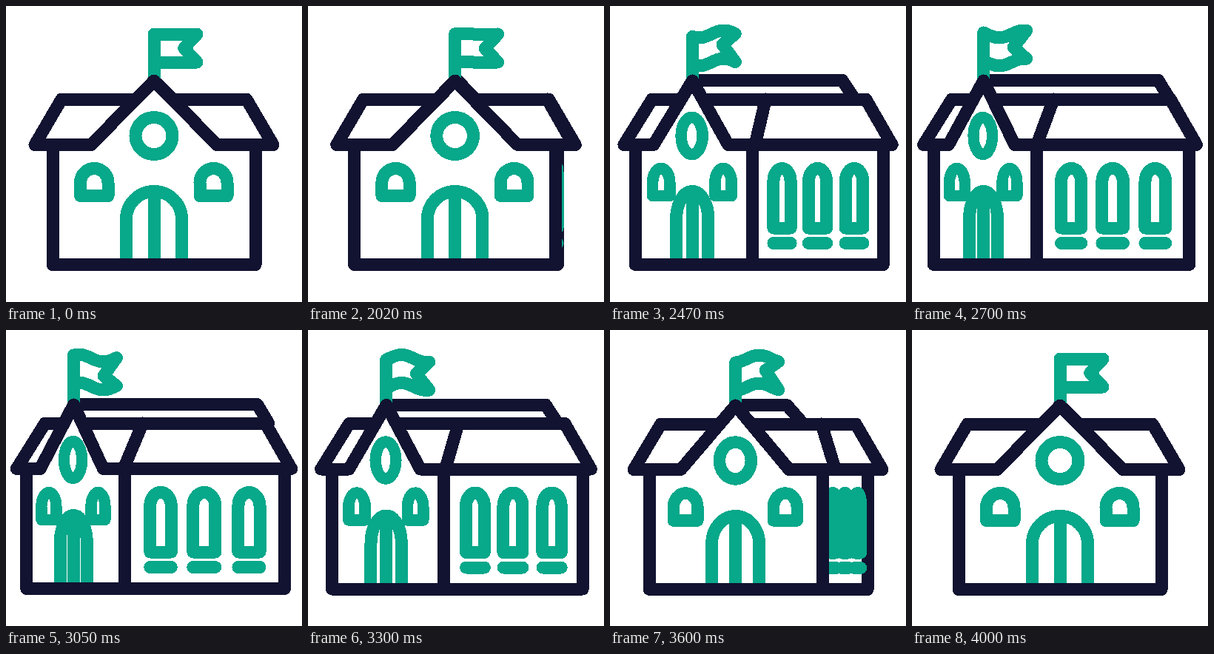
An HTML page for the animation above (4020 ms loop, 400 by 400 pixels).

```html
<!DOCTYPE html>
<html lang="en">
<head>
<meta charset="utf-8">
<title>School</title>
<style>
  html, body { margin: 0; width: 100%; height: 100%; overflow: hidden; background: #fff; }
  svg { display: block; width: 100vw; height: 100vh; shape-rendering: crispEdges; }
  path, ellipse { fill: none; stroke-width: 17; stroke-linejoin: round; stroke-linecap: round; }
  .dark { stroke: #121331; }
  .green { stroke: #08a88a; }
  .butt { stroke-linecap: butt; }
</style>
</head>
<body>
<svg viewBox="0 0 400 400">
  <g id="school">
    <path id="ridge" class="dark"/>
    <path id="flag" class="green butt"/>
    <path id="roof" class="dark"/>
    <path id="sideWall" class="dark"/>
    <path id="sideWindows" class="green"/>
    <path id="frontFill" style="fill:#fff"/>
    <path id="door" class="green butt"/>
    <path id="frontWindows" class="green"/>
    <ellipse id="clock" class="green" cy="175.5" ry="25"/>
    <path id="frontWall" class="dark"/>
    <path id="gable" class="dark"/>
  </g>
</svg>
<script>
const LOOP = 4020, TURN = 2000, BACK = 3000, END = 4000, REACH = 177;
const EAVE = 187.5, LEDGE = 126, PEAK = 101, FLOOR = 349.5;
const $ = Object.fromEntries([...document.querySelectorAll('[id]')].map(el => [el.id, el]));
const clamp = v => Math.max(0, Math.min(1, v));
const draw = (el, d) => el.setAttribute('d', d);

// Cubic easing with flat ends; a and b are the handles' time positions.
function ease(u, a, b) {
  let lo = 0, hi = 1;
  for (let i = 0; i < 24; i++) {
    const s = (lo + hi) / 2, r = 1 - s;
    if (3 * s * r * r * a + 3 * s * s * r * b + s ** 3 < u) lo = s; else hi = s;
  }
  return lo * lo * (3 - 2 * lo);
}

function turnAt(t) {
  if (t < TURN + 10 || t >= END) return 0;
  return t < BACK
    ? REACH * ease((t - TURN) / 1000, .11, .167)
    : REACH * (1 - ease((t - BACK) / 1000, .58, .42));
}

// Position of the wave's crest, in flag lengths.
const CREST = [[2000, .1], [2300, .57], [2700, .94], [3300, 1.5], [3600, 1.7], [4000, 2]];
function crestAt(t) {
  const i = CREST.findIndex(k => k[0] >= t);
  if (i < 1) return i ? 2 : .1;
  const [[t0, a], [t1, b]] = [CREST[i - 1], CREST[i]];
  return a + (b - a) * (t - t0) / (t1 - t0);
}

function flagPath(x, t) {
  const amp = 5 * clamp(Math.min((t - TURN) / 250, (END - t) / 350));
  const crest = crestAt(t);
  const point = (u, y) =>
    `${x + 58 * u},${y - amp * Math.cos(2 * Math.PI * (u - crest) / 1.15)}`;
  const steps = Array.from({ length: 13 }, (_, i) => i / 12);
  const top = steps.map(u => point(u, 38));
  const bottom = steps.map(u => point(u, 76)).reverse();
  return `M${x},${PEAK} L${[...top, point(.7, 57), ...bottom].join(' ')}`;
}

const arch = (l, r, spring, rise, base) =>
  `M${l},${base} V${spring} A${(r - l) / 2},${rise} 0 0 1 ${r},${spring} V${base}`;

function render(t) {
  const d = turnAt(t);
  const at = (x, k) => x - k * d;
  const apex = at(200, .615), left = at(63, .2), corner = at(337, 1), right = at(337, -.224);
  const footL = at(115, .39), footR = at(285, .87);
  const eaveL = at(39, .14), eaveR = at(361, -.14), topL = at(75, .126), topR = at(325, -.144);

  $.school.setAttribute('transform', `translate(0 ${clamp((t - 3150) / 300)})`);

  draw($.ridge, `M${apex},${PEAK - .5} H${at(200, -.79)} L${at(225, -.735)},${LEDGE}`);
  draw($.flag, flagPath(apex, t));
  draw($.roof, `M${footL},${EAVE} H${eaveL} L${topL},${LEDGE} H${topR} L${eaveR},${EAVE} H${footR}
    M${at(325, .795)},${LEDGE} L${at(361, 1.145)},${EAVE}`);
  draw($.sideWall, `M${corner},${FLOOR} H${right} V${EAVE}`);

  const panes = [[.806, .644], [.477, .307], [.131, -.034]];
  draw($.sideWindows, panes.map(([a, b]) => {
    const l = at(337, a), r = at(337, b);
    return `${arch(l, r, 237.5, 18, 300)} Z M${l},320.5 H${r + .01}`;
  }).join(' '));
  $.sideWindows.style.visibility = d ? 'visible' : 'hidden';

  const gable = `M${footL},${EAVE} L${apex},${PEAK} L${footR},${EAVE}`;
  draw($.frontFill, gable);
  draw($.gable, gable);
  draw($.frontWall, `M${left},${EAVE} V${FLOOR} H${corner} V${EAVE}`);

  draw($.door, `${arch(at(162.5, .506), at(237.5, .726), 288, 37.5, 342)} M${apex},251 V342`);
  draw($.frontWindows, `${arch(at(100.5, .298), at(138, .397), 238.5, 19, 256.5)} Z
    ${arch(at(262, .833), at(299, .935), 238.5, 19, 256.5)} Z`);
  $.clock.setAttribute('cx', at(200, .62));
  $.clock.setAttribute('rx', at(25, .073));
  for (const el of [$.clock, $.frontWindows]) el.style.strokeWidth = 17 - .01 * d;
}

const start = performance.now();
function tick() {
  render((performance.now() - start) % LOOP);
  requestAnimationFrame(tick);
}
tick();
</script>
</body>
</html>
```
